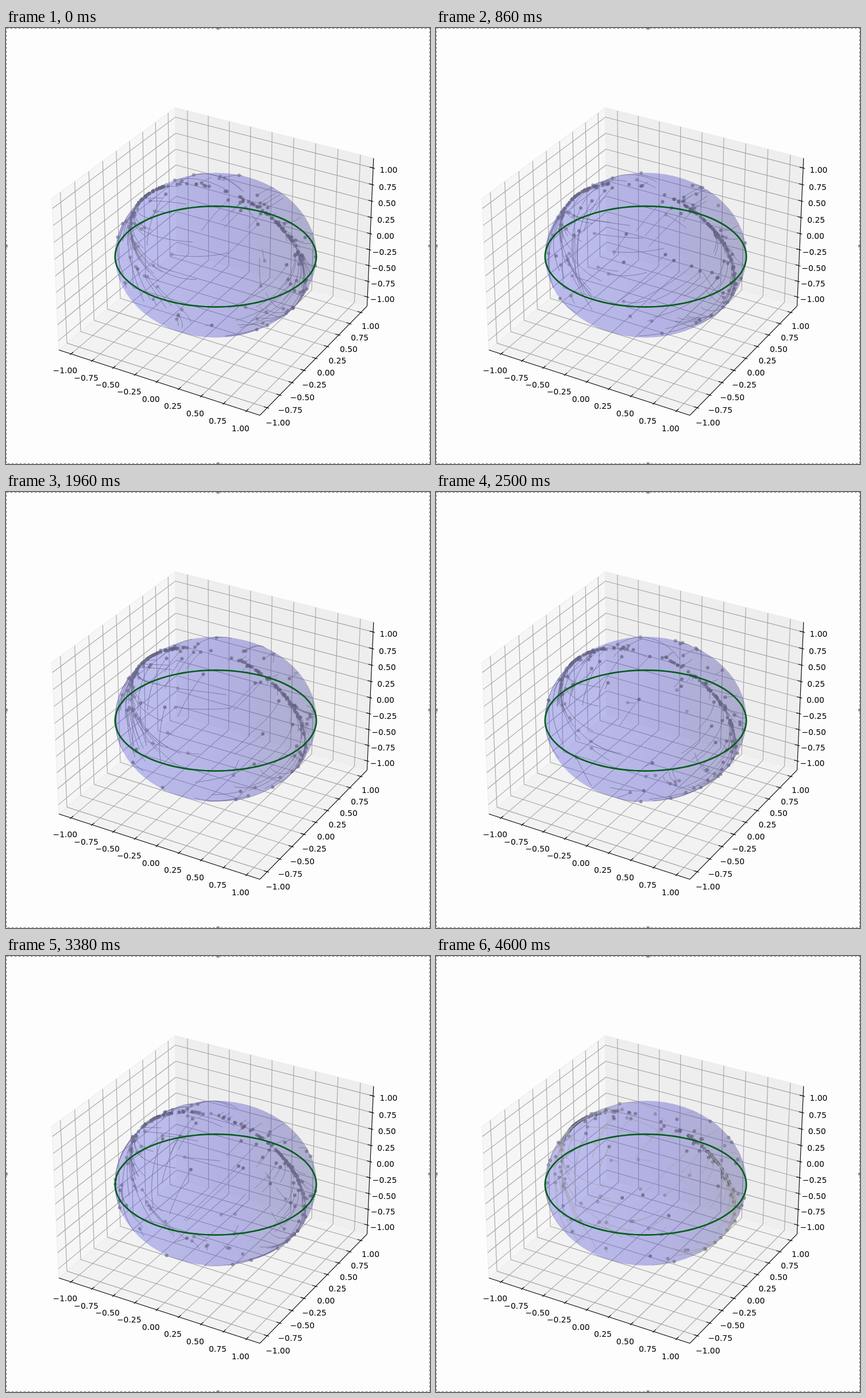
An HTML page with a canvas that plays this animation: 738 by 759 pixels, repeating every 4700 ms.

```html
<!DOCTYPE html>
<html lang="en">
<head>
<meta charset="utf-8">
<title>Flow on a sphere</title>
<style>
html, body { margin: 0; width: 100%; height: 100%; overflow: hidden; background: #fdfdfd; }
canvas { display: block; }
</style>
</head>
<body>
<canvas id="stage" width="738" height="759"></canvas>
<script>
const W = 738, H = 759, LOOP = 4700, LAST = 98;
const LIM = 1.1458, EYE = 20.05, SCALE = 175, CX = 365, CY = 394.1;
const COUNT = 215, LIFE = 44, TRAIL = 10;
const ctx = document.getElementById('stage').getContext('2d');

// Perspective view: azimuth -60 deg, elevation 30 deg, z squeezed to 3/4.
function project(x, y, z) {
  const h = 0.75 * z;
  const depth = 0.433 * x - 0.75 * y + 0.5 * h;
  const s = SCALE * EYE / (EYE - depth);
  return [
    CX + s * (0.866 * x + 0.5 * y),
    CY - s * (-0.25 * x + 0.433 * y + 0.866 * h),
    depth
  ];
}

function trace(g, points, close) {
  g.beginPath();
  points.forEach(p => g.lineTo(p[0], p[1]));
  if (close) g.closePath();
}

function line(g, a, b) {
  trace(g, [project(...a), project(...b)]);
  g.stroke();
}

function drawPane(g, color, ...corners) {
  trace(g, corners.map(c => project(...c.map(v => v * LIM))), true);
  g.fillStyle = color;
  g.fill();
  g.strokeStyle = '#ececec';
  g.stroke();
}

function label(g, value, at) {
  const [x, y] = project(...at);
  g.fillText((value < 0 ? '\u2212' : '') + Math.abs(value).toFixed(2), x, y + 6);
}

function drawBox(g) {
  const L = LIM;
  g.lineWidth = 1.1;
  drawPane(g, '#f6f6f6', [-1, -1, -1], [-1, 1, -1], [-1, 1, 1], [-1, -1, 1]);
  drawPane(g, '#eeeeee', [-1, 1, -1], [1, 1, -1], [1, 1, 1], [-1, 1, 1]);
  drawPane(g, '#f2f2f2', [-1, -1, -1], [1, -1, -1], [1, 1, -1], [-1, 1, -1]);

  const ticks = Array.from({ length: 9 }, (_, i) => i / 4 - 1);
  g.strokeStyle = '#a5a3a6';
  for (const v of ticks) {
    line(g, [v, -L, -L], [v, L, -L]);
    line(g, [v, L, -L], [v, L, L]);
    line(g, [-L, v, -L], [L, v, -L]);
    line(g, [-L, v, -L], [-L, v, L]);
    line(g, [-L, -L, v], [-L, L, v]);
    line(g, [-L, L, v], [L, L, v]);
  }

  g.strokeStyle = g.fillStyle = '#000';
  line(g, [-L, -L, -L], [L, -L, -L]);
  line(g, [L, -L, -L], [L, L, -L]);
  line(g, [L, L, -L], [L, L, L]);

  g.font = '13.89px "DejaVu Sans", sans-serif';
  g.textAlign = 'center';
  const out = L + 0.019, inner = L - 0.038;
  for (const v of ticks) {
    line(g, [v, -out, -L], [v, -inner, -L]);
    line(g, [out, v, -L], [inner, v, -L]);
    line(g, [out, L, v], [inner, L, v]);
    label(g, v, [v, -L - 0.115, -L - 0.168]);
    label(g, v, [L + 0.117, v, -L - 0.166]);
    label(g, v, [L + 0.148, L + 0.045, v]);
  }
}

function drawSphere(g) {
  const shade = g.createLinearGradient(CX - 176, 0, CX + 176, 0);
  [[0, '78,78,226'], [0.3, '76,76,212'], [0.55, '66,62,205'], [1, '54,52,140']]
    .forEach(([at, rgb]) => shade.addColorStop(at, `rgba(${rgb},0.35)`));
  g.fillStyle = shade;
  g.beginPath();
  g.ellipse(CX, 395.5, 175.5, 143.5, 0, 0, 7);
  g.fill();
}

function drawBorder(g) {
  g.strokeStyle = g.fillStyle = '#8b8b8f';
  g.lineWidth = 1.5;
  g.setLineDash([4, 3]);
  g.strokeRect(0.5, 0.5, W - 1, H - 1);
  g.setLineDash([]);
  for (const [x, y] of [[W / 2, 0], [W / 2, H], [0, H / 2], [W, H / 2]]) {
    g.beginPath();
    g.arc(x, y, 3, 0, 7);
    g.fill();
  }
}

let seed = 20177;
function random() {
  seed = (seed + 0x6D2B79F5) | 0;
  let n = Math.imul(seed ^ (seed >>> 15), 1 | seed);
  n = (n + Math.imul(n ^ (n >>> 7), 61 | n)) ^ n;
  return ((n ^ (n >>> 14)) >>> 0) / 4294967296;
}

// Points fall onto the meridian y = 0 and climb it towards z = 0.955.
function makePath() {
  const z0 = 1.85 * random() - 1, turn = 2 * Math.PI * random();
  const r = Math.sqrt(1 - z0 * z0), dt = 0.021;
  let x = r * Math.cos(turn), y = r * Math.sin(turn), z = z0;
  const path = [];
  for (let i = 0; i < LIFE; i++) {
    path.push(project(x, y, z));
    for (let k = 0; k < 2; k++) {
      const fy = -4 * y, fz = 0.955 - z;
      const radial = fy * y + fz * z;
      x -= dt * radial * x;
      y += dt * (fy - radial * y);
      z += dt * (fz - radial * z);
      const n = Math.hypot(x, y, z);
      x /= n; y /= n; z /= n;
    }
  }
  return path;
}

const particles = Array.from({ length: COUNT }, () => ({
  offset: Math.floor(random() * LIFE),
  paths: Array.from({ length: Math.ceil(LAST / LIFE) + 2 }, makePath)
}));

const equator = Array.from({ length: 121 }, (_, i) => {
  const a = i * Math.PI / 60;
  return project(Math.cos(a), Math.sin(a), 0);
});

const backdrop = document.createElement('canvas');
backdrop.width = W;
backdrop.height = H;
const back = backdrop.getContext('2d');
back.fillStyle = '#fdfdfd';
back.fillRect(0, 0, W, H);
drawBox(back);
drawSphere(back);
drawBorder(back);

// Steps are held for 20, 100 and 20 ms in turn.
function stepAt(ms) {
  const part = ms % 140;
  const step = Math.floor(ms / 140) * 3 + (part < 20 ? 0 : part < 120 ? 1 : 2);
  return Math.min(step, LAST);
}

function draw(step) {
  ctx.drawImage(backdrop, 0, 0);
  const trails = particles.map(({ offset, paths }) => {
    const age = step + offset;
    const now = age % LIFE;
    return paths[Math.floor(age / LIFE)].slice(Math.max(0, now - TRAIL), now + 1);
  });

  for (const trail of trails) {
    const [x, y, depth] = trail[trail.length - 1];
    ctx.fillStyle = `rgba(95,93,122,${0.56 + 0.22 * depth})`;
    ctx.beginPath();
    ctx.arc(x, y, 3, 0, 7);
    ctx.fill();
  }

  ctx.lineWidth = 1;
  ctx.lineJoin = 'round';
  ctx.strokeStyle = step === LAST ? 'rgba(160,160,156,0.85)' : 'rgba(113,112,148,0.8)';
  for (const trail of trails) {
    trace(ctx, trail);
    ctx.stroke();
  }

  ctx.strokeStyle = '#005f1a';
  ctx.lineWidth = 2.7;
  trace(ctx, equator, true);
  ctx.stroke();
}

let shown = -1;
const start = performance.now();
function tick() {
  const step = stepAt((performance.now() - start) % LOOP);
  if (step !== shown) draw(shown = step);
  requestAnimationFrame(tick);
}
tick();
</script>
</body>
</html>
```
